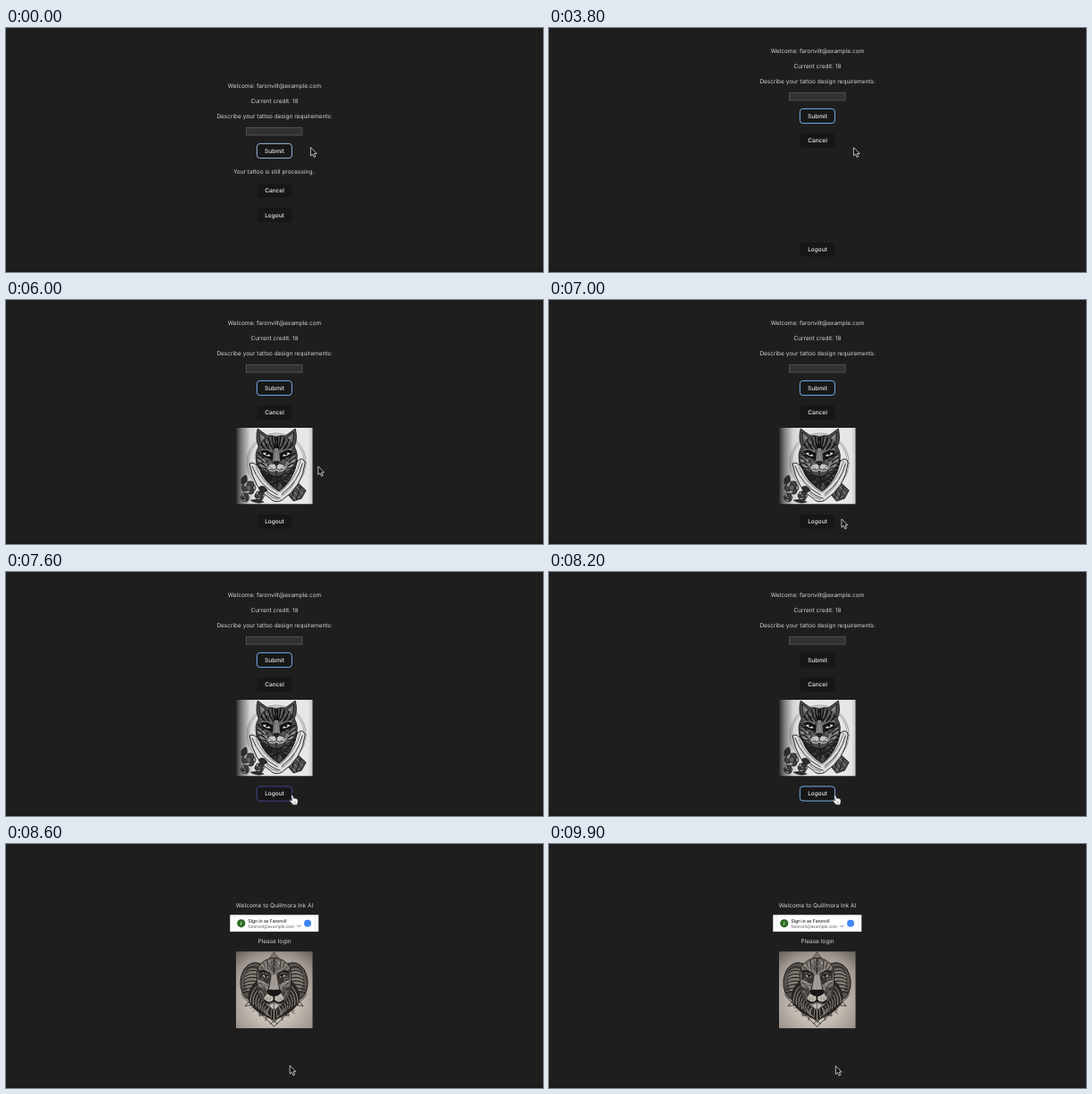
These frames come from a looping animation (600 by 273 pixels, 10 s). An HTML page:

```html
<!DOCTYPE html>
<html lang="en">
<head>
<meta charset="utf-8">
<title>Tattoo generator</title>
<style>
  html, body { margin: 0; width: 100%; height: 100%; overflow: hidden; background: #1e1e1e; }
  svg { display: block; width: 100%; height: 100%; }
  text { font: 400 6.5px Inter, sans-serif; fill: #d2d2d2; text-anchor: middle; text-rendering: geometricPrecision; }
  .btn text { font-weight: 500; fill: #ededed; }
  .btn rect { fill: #171717; }
  .card text { font: 400 4.9px Roboto, sans-serif; fill: #5f6368; text-anchor: start; }
  .card .name { font-weight: 500; font-size: 5.3px; fill: #3c4043; }
  .card .initial { font-size: 5px; fill: #fff; text-anchor: middle; }
  .line { fill: none; stroke-linecap: round; }
</style>
</head>
<body>
<svg id="stage" viewBox="0 0 600 273"></svg>
<script>
const LOOP = 10000;
const EMAIL = 'faronvilt@example.com';

const label = (text, y) => `<text x="300" y="${y + 2.7}">${text}</text>`;
const button = (id, text, y) => `<g class="btn" id="${id}">
  <rect x="280.4" y="${y - 8.1}" width="39" height="16.2" rx="3.4"/>${label(text, y - 0.3)}</g>`;
const shape = (d, fill, stroke = 'none', width = 0.5) =>
  `<path d="${d}" fill="${fill}" stroke="${stroke}" stroke-width="${width}"/>`;
const line = (d, stroke = '#151515', width = 0.6) =>
  `<path class="line" d="${d}" stroke="${stroke}" stroke-width="${width}"/>`;
const mirrored = (axis, half) =>
  `${half}<g transform="translate(${2 * axis}) scale(-1 1)">${half}</g>`;

function randomFrom(seed) {
  return () => (seed = seed * 16807 % 2147483647) / 2147483647;
}

// Short strokes radiating from the centre of an ellipse.
function hatch(count, cx, cy, rx, ry, color, seed, width = 0.4) {
  const random = randomFrom(seed);
  let d = '';
  for (let i = 0; i < count; i++) {
    const angle = random() * Math.PI * 2, r = Math.sqrt(random());
    const dx = Math.cos(angle), dy = Math.sin(angle), length = 1 + random() * 2.5;
    d += `M${(cx + dx * rx * r).toFixed(1)} ${(cy + dy * ry * r).toFixed(1)}` +
         `l${(dx * length).toFixed(1)} ${(dy * length).toFixed(1)}`;
  }
  return line(d, color, width);
}

function rose(x, y, r) {
  let petals = '';
  for (let i = 0; i < 6; i++) {
    const a = i * Math.PI / 3;
    petals += `<circle cx="${x + Math.cos(a) * r * 0.55}" cy="${y + Math.sin(a) * r * 0.55}" r="${r * 0.5}"
      fill="${i % 2 ? '#444' : '#999'}" stroke="#111" stroke-width=".7"/>`;
  }
  return petals + `<circle cx="${x}" cy="${y}" r="${r * 0.4}" fill="#666" stroke="#111" stroke-width=".7"/>`;
}

function cat() {
  const head = shape('M45 10Q40 8 35 9L24 1Q21 12 25 21Q20 30 23 39Q30 51 45.2 55Z', '#4c4c4c', '#111', 0.8);
  const ear = shape('M25.5 5L33 11Q28 14 27 20Z', '#8f8f8f', '#0c0c0c', 0.8) + line('M26 7L29 13M26 11L28 16', '#222', 0.5);
  const cheek = shape('M24 31Q30 33 33 37Q36 43 38 50Q28 47 24 37Z', '#868686');
  const stripes = line('M43.8 10V23M40 10Q41 17 43 24M36 11Q37 18 41 24M31.5 14Q33 20 37 24' +
    'M28 18Q29 22 33 24M24 28Q28 29 30 34M23.5 33Q28 35 31 39M25 39Q30 40 33 44M29 45Q34 45 37 50', '#080808', 1.2);
  const eye = shape('M27 26Q34 21 41 29L41 37Q36 34 30 32Z', '#131313') +
    line('M28 25Q33 22 39 27', '#c8c8c8', 0.7) +
    shape('M29.5 28.5Q34 26 38.5 31.5Q33 32.3 29.5 28.5Z', '#e0e0e0') +
    '<circle cx="34.4" cy="29.2" r="1.4" fill="#080808"/>';
  const muzzle = '<ellipse cx="40.8" cy="44.8" rx="5" ry="4" fill="#c4c4c4"/>' +
    line('M39 44L20 42M39 45.5L21 48', '#bbb', 0.3) +
    line('M45 42V45.5Q42 48.5 37.5 46.5M38 44h.1M40 45.5h.1', '#0c0c0c', 0.8);
  return `
    <rect width="85.5" height="85.5" fill="url(#paper)"/>
    <circle cx="45" cy="39" r="33" class="line" stroke="#555" stroke-width=".5"/>
    <circle cx="45" cy="39" r="31" class="line" stroke="#666" stroke-width=".8" stroke-dasharray=".6 1.4"/>` +
    shape('M22 36Q23 68 46 77Q67 68 69 36Z', '#202020') +
    hatch(90, 46, 56, 18, 14, '#8d8d8d', 31) +
    shape('M54 70L64 57L78 70L73 79L64 82Z', '#4a4a4a', '#111', 0.8) +
    line('M60 66L70 78M64 61L74 74M58 70L66 80', '#b5b5b5', 0.7) +
    line('M67 61L62 78M72 66L67 80M62 63L57 71', '#111', 1) +
    shape('M15 40Q20 37 26 46Q31 61 48 71Q64 59 68 38Q74 31 77 39Q74 66 51 81Q43 85 38 79Q20 69 15 40Z', '#dedede', '#151515', 0.9) +
    line('M18 43Q25 64 46 75M30 67Q40 77 49 79M74 40Q70 60 51 74', '#222', 0.9) +
    line('M22 44Q29 62 47 72M72 37Q67 57 49 72M65 61Q61 69 51 76M34 73Q40 79 46 80', '#777', 1) +
    rose(14, 67, 7.5) + rose(26, 76, 5) + rose(10, 78, 4.5) +
    shape('M6 63Q4 55 11 53Q14 58 10 62ZM25 67Q30 62 35 70Q31 74 27 72ZM16 81Q25 79 31 83Q23 86 16 81Z', '#2c2c2c', '#111') +
    mirrored(45, head + ear + cheek) +
    hatch(130, 45, 29, 18, 19, '#b5b5b5', 7) + hatch(130, 45, 31, 18, 18, '#0e0e0e', 19) +
    mirrored(45, stripes + eye) +
    shape('M43 23H47L49 38H41Z', '#8c8c8c') + line('M44 25L43 36M46 25L47 36', '#444', 0.5) +
    mirrored(45, muzzle) +
    shape('M41 38Q45 36.5 49 38L45 42.3Z', '#242424', '#050505');
}

function lion() {
  let folds = '', strands = '';
  for (let i = 0; i < 8; i++) {
    folds += `M${25 - i * 0.2} ${19 + i * 3.6}Q${17 - i * 0.6} ${14 + i * 4.4} ${11 - i * 0.5} ${21 + i * 3.6}`;
    strands += `M${23 + i * 2} ${39 + i * 3.4}Q${16 + i * 2} ${46 + i * 3} ${16 + i * 3.3} ${57 + i * 2.4}`;
  }
  const ear = shape('M28 14Q17 9 9 20Q2 33 7 46Q11 54 23 55Q28 34 28 14Z', '#58534f', '#141312', 1) +
    shape('M23 20Q15 17 11 25Q8 35 13 44Q21 44 24 34Z', '#837b74') +
    line(folds, '#151413', 1);
  const mane = shape('M24 32Q9 46 16 59Q23 69 42.7 77V55Z', '#2b2826', '#171615') + line(strands, '#a59d95', 0.9);
  const frame = line('M42.5 1L37 8L42.5 13M42.5 4L34 12M8 51L42.5 84M12 50L42.5 79M6 48L15 55L10 61L19 60' +
    'M21 64L29 65L26 72L35 70L33 77M31 66L42.5 74M16 57L24 67M39 81L42.5 77', '#2b2826', 0.8);
  const head = shape('M42.7 7Q31 8 25 17Q22 27 24 38Q24 50 31 57Q35 63 42.7 64Z', '#827b75', '#1a1817', 0.9);
  const shade = shape('M25 20L34 22L39 27L37 37Q30 34 25 31Z', '#3a3633') +
    shape('M24 38Q31 40 34 45Q34 53 37 59Q29 58 25 46Z', '#4b4642');
  const details = line('M42.5 10L37 16L42.5 23M42.5 13L39.5 16.5L42.5 20M35 10L36 20M31 13L33 21M28 17L32 22' +
      'M39 25Q38.5 35 36 43M26 35Q31 37 33 43M25 41Q30 43 32 50M29 48Q32 52 34 59', '#201e1c', 0.8) +
    line('M29 14Q31 19 36 22M26 33Q31 34 34 37M28 44Q31 48 32 54', '#bdb5ad', 0.6) +
    line('M27 23Q32 20 38 25', '#131211', 1.3) +
    shape('M28.5 27Q33 24 37.5 29.5Q32 30.5 28.5 27Z', '#cfc7be', '#0c0c0c', 0.8) +
    '<circle cx="33.5" cy="27.4" r="1.3" fill="#0c0c0c"/>' +
    shape('M42.7 25L40 27L37 43H42.7Z', '#a49c95') +
    '<ellipse cx="37.6" cy="52" rx="5.6" ry="4.8" fill="#c2bab2"/>' +
    shape('M42.7 43Q35 41.5 33.8 45Q36 49.5 42.7 50.5Z', '#191716') +
    line('M42.5 50V54.5Q38 59.5 32 55', '#0f0e0e', 1.5) +
    shape('M42.7 57Q39 59.5 36.5 58.5Q38 64 42.7 65Z', '#c2bab2', '#222', 0.5) +
    line('M35 52h.1M37.5 54h.1M34.5 54h.1M38 51.5h.1', '#272523', 0.8) +
    line('M42.5 65V76M40 64L39 73M37 62L34 71', '#b5ada5', 0.6);
  return `<rect width="85.5" height="85.8" fill="url(#sepia)"/>` +
    mirrored(42.5, frame + ear + mane) +
    hatch(110, 42.5, 62, 24, 12, '#1f1d1b', 43) +
    mirrored(42.5, head + shade) +
    hatch(120, 42.5, 32, 17, 24, '#2f2b29', 5) + hatch(80, 42.5, 34, 16, 24, '#c9c1b9', 23) +
    mirrored(42.5, details);
}

const stage = document.getElementById('stage');
stage.innerHTML = `
  <defs>
    <linearGradient id="paper">
      <stop offset="0" stop-color="#303030"/><stop offset=".07" stop-color="#7c7c7c"/>
      <stop offset=".18" stop-color="#d4d4d4"/><stop offset=".3" stop-color="#e8e8e8"/>
      <stop offset=".94" stop-color="#e6e6e6"/><stop offset="1" stop-color="#c4c4c4"/>
    </linearGradient>
    <radialGradient id="sepia" cy=".62" r=".8">
      <stop offset=".4" stop-color="#c6bdb4"/><stop offset=".75" stop-color="#9d958e"/>
      <stop offset="1" stop-color="#645e59"/>
    </radialGradient>
    <clipPath id="loaded"><rect id="loadedArea" width="85.5" height="0"/></clipPath>
  </defs>
  <rect width="600" height="273" fill="#1e1e1e"/>
  <rect y="272" width="600" height="1" fill="#1a1617"/>
  <g id="account">
    <g id="form">
      ${label('Welcome: ' + EMAIL, 25)}
      ${label('Current credit: 18', 42)}
      ${label('Describe your tattoo design requirements:', 59)}
      <rect x="268.5" y="72.5" width="62.5" height="8.5" fill="#323232" stroke="#606060" stroke-width=".7"/>
      ${button('submit', 'Submit', 98.5)}
    </g>
    <g id="processing">${label('Your tattoo is still processing..', 160)}</g>
    ${button('cancel', 'Cancel', 126)}
    ${button('logout', 'Logout', 248)}
    <g transform="translate(257.2 143)" clip-path="url(#loaded)">${cat()}</g>
  </g>
  <g id="login">
    ${label('Welcome to Quillmora Ink AI', 68.1)}
    <g class="card">
      <rect x="250.3" y="79.3" width="98.9" height="18.8" fill="#fff"/>
      <rect x="254.3" y="80" width="91" height="17.2" rx="1" fill="#fff" stroke="#dadce0" stroke-width=".5"/>
      <circle cx="262.8" cy="88.8" r="4.6" fill="#2c6b22"/>
      <text class="initial" x="262.8" y="90.6">F</text>
      <text class="name" x="270.5" y="87.8">Sign in as Faronvil</text>
      <text x="270.5" y="93.6">${EMAIL}</text>
      ${line('M325.3 91L327.2 92.9L329.1 91', '#5f6368', 0.8)}
      <circle cx="337" cy="88.8" r="4" fill="#4285f4"/>
    </g>
    ${label('Please login', 108.1)}
    <g transform="translate(257 120.3)">${lion()}</g>
  </g>
  <g id="arrow">${shape('M0 0V9.4L2.2 7.5L3.7 11L5.4 10.2L3.9 6.9H6.7Z', '#111', '#e4e4e4', 0.8)}</g>
  <g id="hand" transform="translate(316.3 249)">
    ${shape('M2.3 1.4Q3.2 0 4.3 1.4L5.1 4.2Q6.2 3.5 6.9 4.5Q8 4 8.5 5.1Q9.6 5 9.7 6.5V8.6Q9.6 10.5 8.3 11.4H4.7Q3 10 .8 7.3Q.6 6 2 6.3L3.4 7Z', '#f5f5f5', '#222', 0.5)}
    ${line('M5.6 8V10M7 8V10', '#555', 0.4)}
  </g>`;

const part = Object.fromEntries([...stage.querySelectorAll('[id]')].map(e => [e.id, e]));
const show = (element, visible) => element.setAttribute('display', visible ? 'inline' : 'none');
const moveY = (element, y) => element.setAttribute('transform', `translate(0 ${y})`);

function ring(element, color, width = 1) {
  const box = element.querySelector('rect');
  box.setAttribute('stroke', color);
  box.setAttribute('stroke-width', width);
}

// time, x, y
const path = [
  [0, 340.4, 133.6], [5300, 340.4, 133.6], [5700, 346, 157], [6000, 348.8, 186], [6400, 335, 234],
  [7000, 327, 245], [7200, 322, 246], [7800, 317.2, 247.8], [8900, 317.2, 247.8], [9900, 320.3, 248.2],
  [LOOP, 320.3, 248.2]
];

function pointer(t) {
  const i = path.findIndex(key => key[0] > t);
  const [t0, x0, y0] = path[i - 1], [t1, x1, y1] = path[i];
  const k = (t - t0) / (t1 - t0);
  return [x0 + (x1 - x0) * k, y0 + (y1 - y0) * k];
}

function loadedHeight(t) {
  if (t < 4000) return 0;
  if (t < 4200) return 1;
  return Math.min(3, Math.floor((t - 4100) / 100)) * 28.5;
}

function draw(t) {
  const processing = t < 3800, loggedOut = t >= 8400, hovering = t >= 7400 && !loggedOut;
  const logoutFocused = t >= 8000;

  show(part.account, !loggedOut);
  show(part.login, loggedOut);
  show(part.processing, processing);
  moveY(part.form, processing ? 39 : 0);
  moveY(part.cancel, processing ? 56 : 0);
  moveY(part.logout, processing ? -38.6 : 0);
  part.loadedArea.setAttribute('height', loadedHeight(t));

  ring(part.submit, logoutFocused ? 'none' : processing ? '#9db6dc' : '#78adf0');
  if (logoutFocused) ring(part.logout, '#78adf0');
  else ring(part.logout, hovering ? '#646cff' : 'none', 0.5);

  show(part.arrow, !hovering);
  show(part.hand, hovering);
  part.arrow.setAttribute('transform', `translate(${pointer(t).join(' ')})`);
}

const start = performance.now();
function tick() {
  draw((performance.now() - start) % LOOP);
  requestAnimationFrame(tick);
}
tick();
</script>
</body>
</html>
```
